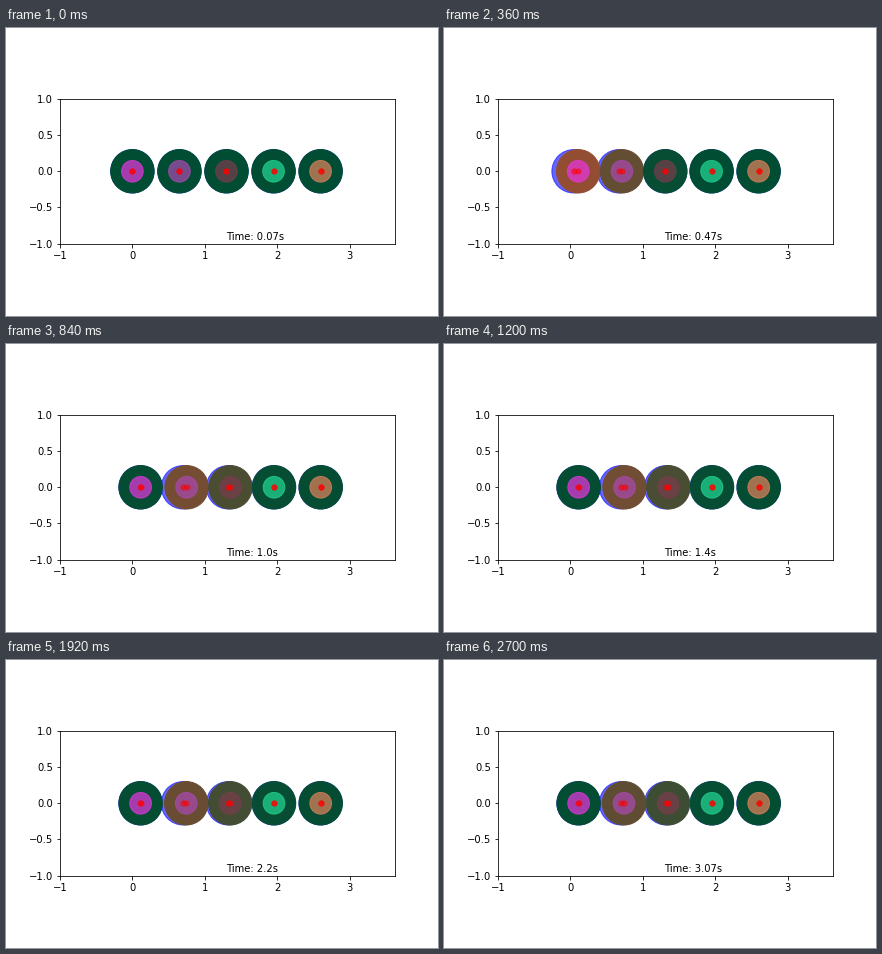
Recreate the animation shown at these times as a matplotlib script. Size 432x288 px, loop 2760 ms.

```python
import numpy as np
import matplotlib.pyplot as plt
from matplotlib.animation import FuncAnimation

FRAMES, INTERVAL, FPS = 46, 60, 15
GAIN = 9        # how strongly strain turns a disc red
RISE = 7        # steps a disc takes to move
DECAY = 150     # steps in which the strain relaxes
BLUE = (0, 0, 1)

index = np.arange(5)
rest = 0.65 * index
start = 2 * index       # the push travels along the row
delay = 3 - 2 * index   # head start of each disc over its shadow
travel = np.array([0.112, 0.049, 0.022, 0.004, 0])
strain = np.array([0.002, 0.056, 0.036, 0.003, 0.002])
core_colors = ["#eb35e4", "#ab4ab2", "#793c4e", "#24d996", "#e4835d"]

plt.rcParams.update({"font.family": "DejaVu Sans", "font.size": 10})
fig, ax = plt.subplots(figsize=(6, 4), dpi=72)
fig.subplots_adjust(left=0.125, right=0.9, bottom=0.125, top=0.88)
ax.set_aspect("equal")
ax.set_xlim(-1, 3.625)
ax.set_ylim(-1, 1)
ax.set_xticks(range(-1, 4))
ax.set_yticks(np.arange(-1, 1.1, 0.5))


def disc(x, radius, z, **style):
    return ax.add_patch(plt.Circle((x, 0), radius, zorder=z, **style))


def dots(z):
    return ax.plot(rest, 0 * rest, "ro", ms=5.5, mew=0.5, alpha=0.6, zorder=z)[0]


def ease(step):
    u = np.clip(step / RISE, 0, 1)
    return u * u * (3 - 2 * u)


shadows = [disc(x, 0.3, 2, color=BLUE, alpha=0.6) for x in rest]
bodies = [disc(x, 0.3, 3) for x in rest]
cores = [disc(x, 0.15, 4, color=c, alpha=0.7) for x, c in zip(rest, core_colors)]
shadow_dots, body_dots = dots(5), dots(6)
label = ax.text(1.3, -0.95, "", zorder=7)


def update(step):
    stretch = strain * np.exp(-step / DECAY)
    front = rest + (travel + stretch) * ease(step - start)
    back = rest + travel * ease(step - start - delay)
    red = np.clip(GAIN * (front - back), 0, 1)
    for i in index:
        shadows[i].center = back[i], 0
        bodies[i].center = cores[i].center = front[i], 0
        bodies[i].set_color((red[i], 0.3, 0.2))
    shadow_dots.set_xdata(back)
    body_dots.set_xdata(front)
    label.set_text(f"Time: {round((step + 1) / FPS, 2)}s")
    return [*shadows, *bodies, *cores, shadow_dots, body_dots, label]


anim = FuncAnimation(fig, update, frames=FRAMES, interval=INTERVAL, repeat=True)
plt.show()
```
